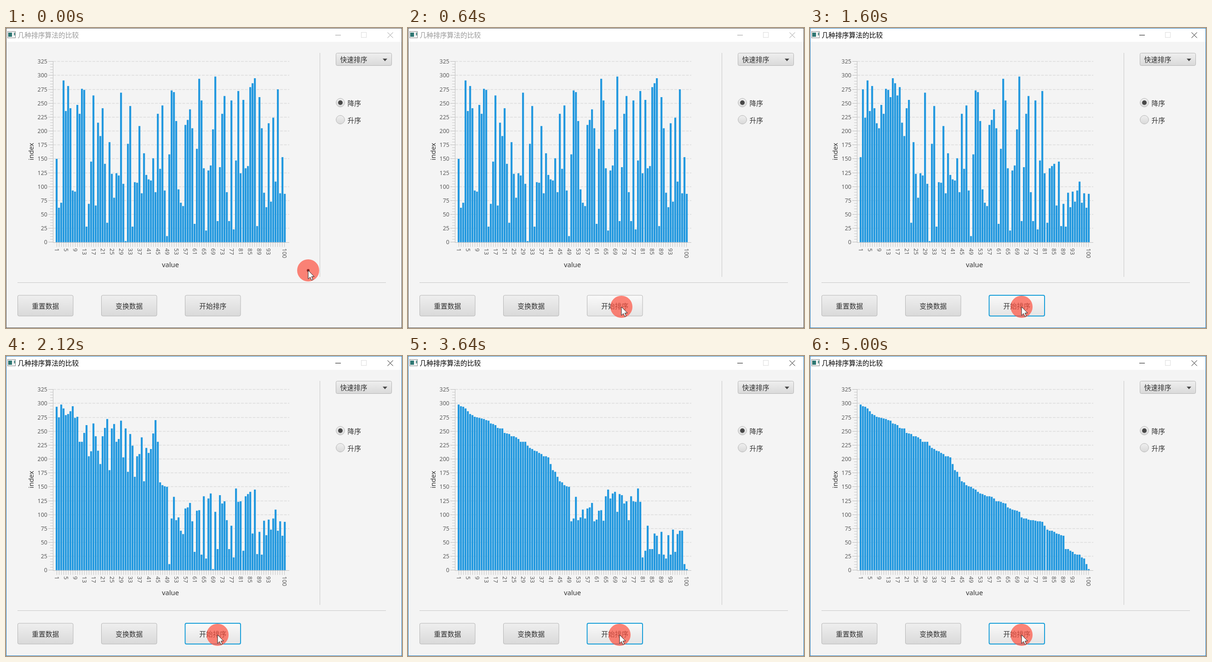
Write an HTML page that moves like this. It is 861 px wide and 651 px high and loops after 5320 ms.

```html
<!DOCTYPE html>
<html lang="zh">
<head>
<meta charset="utf-8">
<title>几种排序算法的比较</title>
<style>
  html, body { margin: 0; width: 100%; height: 100%; overflow: hidden; background: #f4f4f4; }
  svg { display: block; }
  text { font: 14.75px "Noto Sans CJK SC", "Noto Sans CJK", sans-serif; fill: #333; }
  .latin { font-family: "Noto Sans", "Open Sans", sans-serif; }
  .tick { font: 12.5px "Noto Sans", "Open Sans", sans-serif; fill: #5c5c5c; }
  .mid { text-anchor: middle; }
  .end { text-anchor: end; }
  #caption { fill: #999; }
  #frame { stroke: #5a5a5a; }
  .control { stroke: #999; fill: none; }
  .active #caption { fill: #000; }
  .active #frame { stroke: #2b7fc0; }
  .active .control { stroke: #111; }
  .button { fill: url(#face); stroke: #b5b5b5; }
  .hover .go { fill: url(#light); }
  .active .go { fill: url(#light); stroke: #1a9fd9; stroke-width: 2; }
</style>
</head>
<body>
<svg id="stage" width="861" height="651" viewBox="0 0 861 651">
  <defs>
    <linearGradient id="face" x2="0" y2="1">
      <stop offset="0" stop-color="#efefef"/><stop offset="1" stop-color="#d9d9d9"/>
    </linearGradient>
    <linearGradient id="light" x2="0" y2="1">
      <stop offset="0" stop-color="#fafafa"/><stop offset="1" stop-color="#e4e4e4"/>
    </linearGradient>
  </defs>
  <rect width="861" height="651" fill="#f4f4f4"/>
  <rect width="861" height="30" fill="#fff"/>
  <rect x="3.5" y="7.5" width="17" height="14" fill="#f4f4f4" stroke="#8a8a8a"/>
  <rect x="5" y="10" width="8" height="9" fill="#2f7773"/>
  <path d="M18.5 10v6" stroke="#2f7773" stroke-width="2"/>
  <text id="caption" x="25.5" y="20.6">几种排序算法的比较</text>
  <path class="control" d="M716 15.5h12"/>
  <rect x="772.5" y="9.5" width="11" height="11" fill="none" stroke="#ddd"/>
  <path class="control" d="M829.5 9.5l12 12m0-12l-12 12"/>
  <path d="M682.5 54v486M25 552.5h801" stroke="#c8c8c8"/>

  <g id="axes"></g>
  <g id="bars" fill="#2499df"></g>
  <path d="M102 465.5H616" stroke="#c0c0c0"/>
  <text class="latin mid" x="357.5" y="519">value</text>
  <text class="latin mid" transform="translate(59.5 268) rotate(-90)">index</text>

  <rect class="button" x="717.5" y="54.5" width="121" height="27" rx="3"/>
  <text x="726.5" y="74.3">快速排序</text>
  <path d="M819 66.500h10l-5 5.500z" fill="#444"/>
  <circle class="button" cx="727" cy="162" r="9.300"/>
  <circle cx="727" cy="162" r="5" fill="#484848"/>
  <circle class="button" cx="727" cy="199" r="9.300"/>
  <text x="742.5" y="168.6">降序</text>
  <text x="742.5" y="205.6">升序</text>
  <g id="buttons"></g>

  <g id="pointer">
    <circle r="24" fill="#fe5240" fill-opacity=".7"/>
    <circle id="dot" r="3" fill="#8e2320"/>
    <path d="M0 0V18.500L4.300 14.600L7.300 21.300L10.300 20L7.400 13.400H13Z" fill="#fff" stroke="#222"/>
  </g>
  <rect id="frame" x=".5" y=".5" width="860" height="650" fill="none"/>
</svg>
<script>
const $ = id => document.getElementById(id);
const LOOP = 5320, STEP = 40;
const BASE = 464.8, UNIT = 392 / 325, PITCH = 5.01;

const start = [
  150, 62, 71, 291, 236, 281, 241, 93, 91, 247, 231, 276, 274, 28, 69, 145, 264, 66, 215, 191,
  241, 141, 35, 180, 123, 80, 124, 120, 269, 105, 2, 177, 245, 28, 108, 107, 209, 88, 160, 121,
  113, 111, 151, 90, 231, 132, 246, 93, 11, 158, 273, 270, 218, 95, 71, 65, 211, 220, 239, 205,
  33, 168, 294, 255, 133, 21, 129, 138, 203, 298, 38, 135, 231, 263, 90, 38, 255, 23, 147, 272,
  124, 256, 133, 137, 279, 286, 295, 29, 261, 205, 89, 63, 214, 73, 224, 109, 275, 88, 153, 87
];

// Descending quicksort; every write is logged, also those that change nothing.
const log = [];
let lastChange = 0;
function quicksort(a, lo, hi) {
  if (lo >= hi) return;
  const put = (pos, val) => {
    log.push([pos, val]);
    if (a[pos] !== val) lastChange = log.length;
    a[pos] = val;
  };
  const pivot = a[lo];
  let i = lo, j = hi;
  while (i < j) {
    while (i < j && a[j] <= pivot) j--;
    put(i, a[j]);
    while (i < j && a[i] >= pivot) i++;
    put(j, a[i]);
  }
  put(i, pivot);
  quicksort(a, lo, i - 1);
  quicksort(a, i + 1, hi);
}
quicksort(start.slice(), 0, start.length - 1);

// [ms, writes done]
const pace = [
  [1040, 0], [1600, 20], [2120, 79], [2760, 149],
  [3640, log.findIndex(w => w[0] === 77) + 1], [5000, lastChange]
];
// [ms, x, y]
const path = [
  [0, 657, 526], [560, 655, 529], [600, 560, 568], [640, 464, 605],
  [720, 449, 604], [800, 460, 605]
];

function at(table, t, col) {
  if (t <= table[0][0]) return table[0][col];
  for (let k = 1; k < table.length; k++) {
    const a = table[k - 1], b = table[k];
    if (t <= b[0]) return a[col] + (b[col] - a[col]) * (t - a[0]) / (b[0] - a[0]);
  }
  return table[table.length - 1][col];
}

function drawAxes() {
  let s = '';
  const line = (d, color, extra = '') => s += `<path d="${d}" stroke="${color}" ${extra}/>`;
  for (let v = 0; v <= 325; v += 5) {
    const y = Math.round(BASE - v * UNIT - .5) + .5;
    if (v % 25) {
      line(`M96 ${y}h6`, '#c8c8c8');
      continue;
    }
    line(`M92 ${y}h10`, '#bcbcbc');
    if (v) line(`M103 ${y}H616`, '#dcdcdc', 'stroke-width="1.3" stroke-dasharray="6 2.500"');
    s += `<text class="tick end" x="90" y="${y + 4.5}">${v}</text>`;
  }
  line('M102.500 72V466', '#c0c0c0');
  for (let n = 1; n <= 100; n++) {
    const x = 110 + PITCH * (n - 1);
    line(`M${Math.round(x - .5) + .5} 466v9`, '#c4c4c4');
    if (n === 100 || n % 4 === 1 && n < 97)
      s += `<text class="tick" transform="translate(${x - 4.5} 478) rotate(90)">${n}</text>`;
  }
  $('axes').innerHTML = s;
}

function drawButtons() {
  $('buttons').innerHTML = ['重置数据', '变换数据', '开始排序'].map((label, k) => {
    const x = 25.5 + 182 * k;
    return `<rect class="button${k === 2 ? ' go' : ''}" x="${x}" y="580" width="120.500" height="45" rx="3"/>` +
      `<text class="mid" x="${x + 60.3}" y="608.6">${label}</text>`;
  }).join('');
}

drawAxes();
drawButtons();
$('bars').innerHTML = start.map((_, i) =>
  `<rect x="${Math.round(107.7 + PITCH * i)}" width="4.200"/>`).join('');
const bars = [...$('bars').children];

function render(now) {
  const t = Math.floor((now % LOOP) / STEP) * STEP;
  const vals = start.slice();
  const done = Math.floor(at(pace, t, 1) + 1e-6);
  for (let k = 0; k < done; k++) vals[log[k][0]] = log[k][1];
  bars.forEach((bar, i) => {
    const h = vals[i] * UNIT;
    bar.setAttribute('y', BASE - h);
    bar.setAttribute('height', h);
  });
  $('pointer').setAttribute('transform', `translate(${at(path, t, 1)} ${at(path, t, 2)})`);
  $('dot').style.display = t < 280 ? '' : 'none';
  $('stage').classList.toggle('hover', t >= 640);
  $('stage').classList.toggle('active', t >= 1000);
}

const t0 = performance.now();
function tick() {
  render(performance.now() - t0);
  requestAnimationFrame(tick);
}
tick();
</script>
</body>
</html>
```
